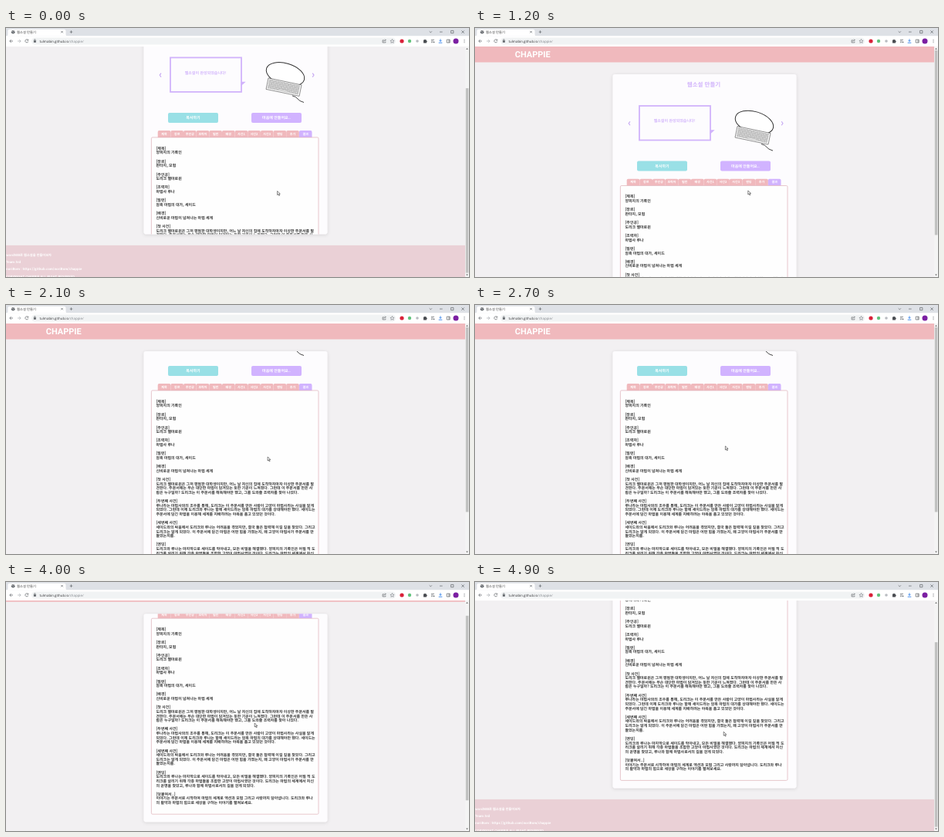
Write an HTML page that moves like this. It is 600 by 323 pixels and loops after 5 s.

```html
<!DOCTYPE html>
<html lang="ko">
<head>
<meta charset="utf-8">
<title>웹소설 만들기</title>
<style>
  html, body { margin: 0; width: 100%; height: 100%; overflow: hidden; background: #f2f0f2; }
  svg { display: block; width: 100vw; height: 100vh; }
  text { font-family: "Noto Sans CJK KR", "Noto Sans CJK", "Noto Sans", sans-serif; text-rendering: geometricPrecision; white-space: pre; }
  .bold { font-weight: 700; }
  .mid { text-anchor: middle; }
  .ui { font-family: "Open Sans", "Noto Sans CJK KR", sans-serif; }
  .line { fill: none; stroke: #5f6368; stroke-width: .7; }
</style>
</head>
<body>
<svg viewBox="0 0 600 323" preserveAspectRatio="none">
  <defs>
    <clipPath id="pageClip"><rect y="24" width="600" height="299"/></clipPath>
    <clipPath id="cardClip"><rect x="178.5" y="60" width="238" height="270" rx="3"/></clipPath>
    <filter id="shadow" x="-10%" y="-10%" width="120%" height="120%">
      <feDropShadow dx="0" dy="1" stdDeviation="2" flood-color="#000" flood-opacity=".12"/>
    </filter>
  </defs>

  <rect width="600" height="323" fill="#f2f0f2"/>

  <g clip-path="url(#pageClip)">
    <g id="page">
      <rect y="24" width="595" height="20.5" fill="#f0b9bd"/>
      <text x="51.7" y="38.2" class="bold" style="font-family:Roboto,sans-serif" font-size="11" fill="#fff">CHAPPIE</text>

      <rect x="178.5" y="60" width="238" height="270" rx="3" fill="#fdfcfe" filter="url(#shadow)"/>
      <g clip-path="url(#cardClip)">
        <g id="content">
          <text x="296.5" y="76.4" class="bold mid" font-size="7.5" fill="#d1b3fb">웹소설 만들기</text>
          <g fill="none" stroke="#c4a5f2" stroke-width="1.1">
            <path d="M201 121.2l-1.8 2.5 1.8 2.5M397.2 121.2l1.8 2.5-1.8 2.5"/>
            <rect x="213" y="101" width="92" height="44.5" stroke="#d1b3fb" stroke-width="1.8"/>
          </g>
          <path d="M304.5 132.3h6.2l-6.2 5.6z" fill="#d1b3fb"/>
          <text x="258.6" y="122.3" class="bold mid" font-size="5" fill="#d1b3fb">웹소설이 완성되었습니다!</text>

          <ellipse cx="362" cy="122.5" rx="25.5" ry="14" transform="rotate(17 362 122.5)" fill="#fff" stroke="#333" stroke-width="1"/>
          <g id="keyboard" transform="matrix(43 9 -3 14.5 340 127.5)"></g>
          <path d="M371 150.5q5 1 7 4t8 4.6" fill="none" stroke="#333" stroke-width=".9"/>

          <rect x="210" y="172.5" width="65" height="13" rx="2" fill="#99e0e6"/>
          <rect x="318" y="172.5" width="65" height="13" rx="2" fill="#d1b3ff"/>
          <g class="bold mid" font-size="5" fill="#fff">
            <text x="242.5" y="180.8">복사하기</text>
            <text x="350.5" y="180.8">마음에 안들어요..</text>
          </g>
          <g id="tabs" class="bold mid" font-size="4"></g>
          <rect x="188.4" y="204.5" width="216.6" height="254" rx="1.5" fill="#fefefe" stroke="#dfb1b8" stroke-width=".7"/>
          <g id="story" class="bold" font-size="4.94" fill="#333"></g>
        </g>
      </g>

      <rect y="344.5" width="595" height="44" fill="#ead0d6"/>
      <g id="footer" class="bold" font-size="4.2" fill="#fff"></g>
    </g>
    <rect x="595" y="24" width="5" height="299" fill="#f4f4f4"/>
    <path d="M596.2 27.7l1.3-1.6 1.3 1.6zM596.2 319.6l1.3 1.6 1.3-1.6z" fill="#606060"/>
    <rect id="thumb" x="595.8" y="29" width="3.6" height="239.5" fill="#c1c1c1"/>
  </g>

  <g id="browser">
    <rect width="600" height="10.5" fill="#dee1e6"/>
    <path d="M0 10.5q2.5 0 2.5-2.5v-4q0-2.3 2.3-2.3h70.4q2.3 0 2.3 2.3v4q0 2.5 2.5 2.5z" fill="#fff"/>
    <rect y="10.3" width="600" height="13.7" fill="#fff"/>
    <rect x="33" y="12.6" width="472" height="9" rx="4.5" fill="#f1f3f4"/>
    <circle cx="9.2" cy="5.2" r="2.3" fill="#5f6368"/>
    <path d="M7.3 4.4l1.8.5.5 1.6M9.2 3.2l1.7 1.4" fill="none" stroke="#fff" stroke-width=".5"/>
    <text x="14" y="6.9" class="ui" font-size="4.3" fill="#444">웹소설 만들기</text>
    <g class="line">
      <path d="M71.3 3.9l2.5 2.5m0-2.5l-2.5 2.5M82.7 5.1h3.6m-1.8-1.8v3.6"/>
      <path d="M548.7 4.3l1.6 1.6 1.6-1.6M562 5.1h3.6M576.6 3.4h3.3v3.3h-3.3zM590.4 3.4l3.4 3.4m0-3.4l-3.4 3.4"/>
      <path d="M9 17H4.8m2-2l-2 2 2 2"/>
      <path d="M15 17h4.2m-2-2l2 2-2 2" stroke="#a8abb0"/>
      <path d="M28.6 15.8a2 2 0 1 0 .2 1.7M28.8 14.6v1.5h-1.5"/>
      <path d="M36.5 16.4v-.8a.9.9 0 0 1 1.8 0v.8"/>
      <path d="M489.7 15.8h-1.6v3.1h3.8v-1.4M489.6 17.6q.3-2 2.6-2m-1-1l1 1-1 1"/>
      <path d="M500.5 14.5l.8 1.7 1.8.2-1.4 1.2.4 1.8-1.6-.9-1.6.9.4-1.8-1.4-1.2 1.8-.2z" stroke-width=".5"/>
      <path d="M550.9 15.3h4.1m-4.1 1.7h2.6m-2.6 1.7h2"/>
      <path d="M571.2 15.1h4v3.9h-4zM574 15.1v3.9"/>
    </g>
    <rect x="35.9" y="16.3" width="3" height="2.5" rx=".3" fill="#5f6368"/>
    <circle cx="554.5" cy="18.3" r=".9" fill="#5f6368"/>
    <text x="43.5" y="18.5" class="ui" font-size="4.4" fill="#303134">tulmabin.github.io<tspan fill="#80868b">/chappie/</tspan></text>
    <circle cx="513" cy="17" r="2.6" fill="#d9223a"/>
    <circle cx="523" cy="17" r="2.2" fill="#62c37d"/>
    <circle cx="533" cy="17" r="1.8" fill="#b9bcc1"/>
    <path d="M541 15.6h1.2a.8.8 0 0 1 1.6 0h1.2v1.2a.8.8 0 0 1 0 1.6v1.2h-4z" fill="#4a4d52"/>
    <path d="M563 14.3v3m-1.5-1.4l1.5 1.5 1.5-1.5M560.7 19.2h4.6" fill="none" stroke="#1a73e8" stroke-width=".8"/>
    <circle cx="583" cy="17" r="3.5" fill="#7b1fa2"/>
    <g fill="#5f6368"><circle cx="594" cy="15.2" r=".5"/><circle cx="594" cy="17" r=".5"/><circle cx="594" cy="18.8" r=".5"/></g>
  </g>

  <path id="cursor" d="M0 0v5l1.2-1.1.9 2 .9-.4-.9-2h1.6z" fill="#fff" stroke="#222" stroke-width=".55"/>
</svg>

<script>
const LOOP = 5000, STEP = 100;
const $ = id => document.getElementById(id);

function add(parent, tag, attrs, text) {
  const el = document.createElementNS('http://www.w3.org/2000/svg', tag);
  for (const key in attrs) el.setAttribute(key, attrs[key]);
  if (text) el.textContent = text;
  parent.append(el);
}

const story = `[제목]
양피지의 기록인

[장르]
판타지, 모험

[주인공]
도리크 벨마로윈

[조력자]
마법사 루나

[빌런]
암흑 마법의 대가, 세이드

[배경]
신비로운 마법이 넘쳐나는 마법 세계

[첫 사건]
도리크 벨마로윈은 그저 평범한 대학생이지만, 어느 날 자신의 집에 도착하자마자 이상한 주문서를 발
견한다. 주문서에는 무슨 대단한 마법이 담겨있는 듯한 기운이 느껴졌다. 그런데 이 주문서를 만든 사
람은 누구일까? 도리크는 이 주문서를 해독해야만 했고, 그를 도와줄 조력자를 찾아 나섰다.

[두번째 사건]
루나라는 마법사와의 조우를 통해, 도리크는 이 주문서를 만든 사람이 고양이 마법사라는 사실을 알게
되었다. 그런데 이제 도리크와 루나는 함께 세이드라는 암흑 마법의 대가를 상대해야만 했다. 세이드는
주문서에 담긴 마법을 이용해 세계를 지배하려는 야욕을 품고 있었던 것이다.

[세번째 사건]
세이드와의 싸움에서 도리크와 루나는 어려움을 겪었지만, 결국 둘은 협력해 이길 길을 찾았다. 그리고
도리크는 알게 되었다. 이 주문서에 담긴 마법은 어떤 힘을 가졌는지, 왜 고양이 마법사가 주문서를 만
들었는지를.

[엔딩]
도리크와 루나는 마지막으로 세이드를 막아내고, 모든 비밀을 해결했다. 양피지의 기록인은 어릴 적 도
리크를 살리기 위해 각종 마법들을 조합한 고양이 마법사였던 것이다. 도리크는 마법의 세계에서 자신
의 운명을 찾았고, 루나와 함께 마법사로서의 길을 걷게 되었다.

[덧붙여서..]
이야기는 주문서로 시작하여 마법의 세계로 액션과 모험 그리고 사랑까지 담아냅니다. 도리크와 루나
의 활약과 마법의 힘으로 세상을 구하는 이야기를 펼쳐보세요.`;

story.split('\n').forEach((line, i) =>
  add($('story'), 'text', { x: 194.5, y: 220.4 + i * 5.625 }, line));

'제목 장르 주인공 조력자 빌런 배경 사건1 사건2 사건3 엔딩 추가 결과'.split(' ').forEach((label, i) => {
  const x = 196.7 + i * 16.65, last = i === 11;
  add($('tabs'), 'path', {
    d: `M${x} 204.5v-7q0-1.8 1.8-1.8h13.05q1.8 0 1.8 1.8v7z`,
    fill: last ? '#d1b3ff' : '#f0b9bd'
  });
  add($('tabs'), 'text', { x: x + 8.3, y: 201.4, fill: '#fff' }, label);
});

['wordNIB로 웹소설을 만들어보자', 'Team 3rd',
 'noriBom : https://github.com/noriBom/chappie',
 'COPYRIGHT CHAPPIE ALL RIGHT RESERVED'].forEach((line, i) =>
  add($('footer'), 'text', { x: 0, y: 358.5 + i * 9.3 }, line));

// The keyboard is built in a unit square and skewed into place.
const hairline = { fill: '#fff', stroke: '#444', 'stroke-width': .6, 'vector-effect': 'non-scaling-stroke' };
add($('keyboard'), 'rect', { width: 1, height: 1, ...hairline });
for (let row = 0; row < 5; row++)
  for (let col = 0; col < 15; col++) {
    if (row === 4 && col > 4 && col < 10) continue;
    add($('keyboard'), 'rect', {
      x: .04 + col * .062, y: .1 + row * .165, width: .045, height: .11,
      ...hairline, fill: '#ddd', stroke: '#777', 'stroke-width': .35
    });
  }
add($('keyboard'), 'rect', { x: .35, y: .76, width: .29, height: .11, ...hairline, 'stroke-width': .35 });

// Keys are [time, ...values]; values ease between neighbouring keys.
const pageKeys = [[0, 62.6], [658, 62.6], [898, 0], [3907, 0], [4147, 62.6]];
const cardKeys = [[0, 0], [1437, 0], [1830, 93.6], [2720, 93.6], [3150, 138.5]];
const cursorKeys = [
  [0, 351.6, 211.6], [200, 351.6, 211.6], [750, 353.8, 211], [1900, 353.8, 211],
  [2300, 324.4, 183], [2700, 324.4, 183], [3200, 322.6, 180], [3800, 322.6, 180],
  [4000, 322.2, 183], [4200, 322.2, 194.3]
];

const ease = u => u < .5 ? 2 * u * u : 1 - 2 * (1 - u) ** 2;

function valuesAt(keys, time) {
  const next = keys.findIndex(key => key[0] > time);
  if (next < 0) return keys[keys.length - 1].slice(1);
  const [start, ...from] = keys[next - 1], [end, ...to] = keys[next];
  const u = ease((time - start) / (end - start));
  return from.map((v, i) => v + (to[i] - v) * u);
}

function move(id, x, y) {
  $(id).setAttribute('transform', `translate(${x} ${y})`);
}

function draw(time) {
  const [pageScroll] = valuesAt(pageKeys, time);
  const [cardScroll] = valuesAt(cardKeys, time);
  move('page', 0, -pageScroll);
  move('content', 0, -cardScroll);
  move('thumb', 0, pageScroll * .785);
  move('cursor', ...valuesAt(cursorKeys, time));
}

const began = performance.now();
function tick() {
  const time = (performance.now() - began) % LOOP;
  draw(Math.floor(time / STEP) * STEP);
  requestAnimationFrame(tick);
}
tick();
</script>
</body>
</html>
```
